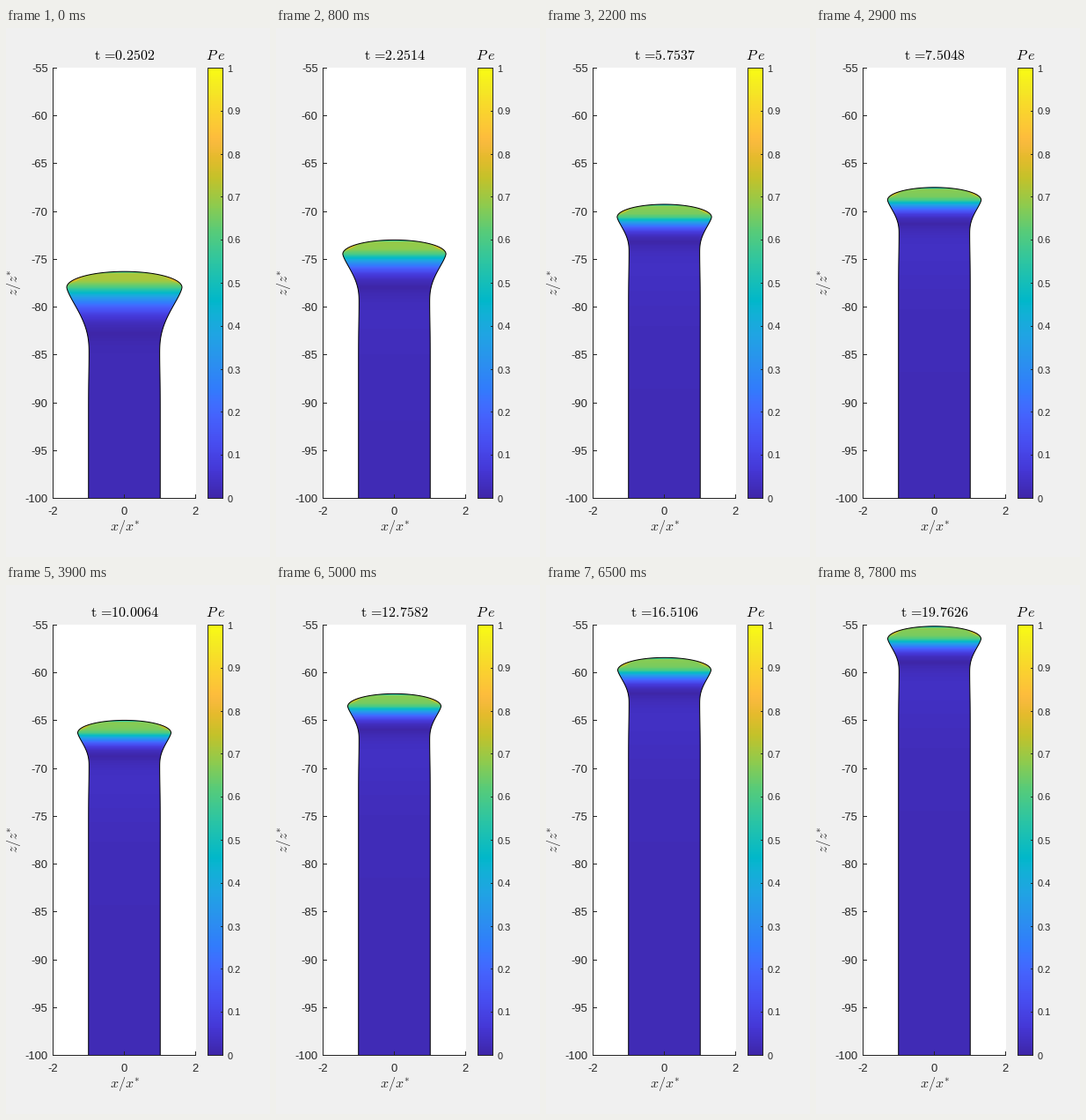
Write a matplotlib script that moves like this. It is 300 by 600 pixels and loops after 7.9 s.

```python
import numpy as np
import matplotlib.pyplot as plt
from matplotlib.animation import FuncAnimation
from matplotlib.colors import LinearSegmentedColormap
from matplotlib.patches import Polygon, Rectangle

W, H, DPI = 300, 600, 100
PX = 72 / DPI  # points per pixel
FRAMES, INTERVAL = 79, 100
DT = 0.25016
INK = "#262626"

LEFT, RIGHT, TOP, BOTTOM = 53, 216, 45, 534
CX, RADIUS = 134.5, 40.75

plt.rcParams["mathtext.fontset"] = "cm"
plt.rcParams["font.family"] = "Liberation Sans"

STOPS = [0, 4, 8, 12, 14, 16, 20, 24, 27, 29, 32, 35, 39, 43, 47, 50, 52, 53,
         57, 60, 63]
COLORS = ["#3e26a8", "#4537d5", "#484df0", "#4563fd", "#3e6fff", "#327cfc",
          "#2b91ef", "#20a5e3", "#12b1d6", "#01b8ca", "#19bfb6", "#31c69f",
          "#57cc7a", "#8fcb4e", "#c5c22a", "#e6bb2d", "#f8ba3d", "#febe3c",
          "#fad62d", "#f5e924", "#f9fb15"]
CMAP = LinearSegmentedColormap.from_list(
    "heat", [(s / 63, c) for s, c in zip(STOPS, COLORS)])

fig = plt.figure(figsize=(W / DPI, H / DPI), dpi=DPI, facecolor="#f0f0f0")
ax = fig.add_axes([0, 0, 1, 1])
ax.axis("off")


def line(x0, y0, x1, y1):
    ax.plot([x0, x1], [y0, y1], color=INK, lw=PX, solid_capstyle="butt",
            snap=False, zorder=5)


def label(x, y, s, size, ha="center", color=INK, **kw):
    return ax.text(x, y, s, fontsize=size * PX, ha=ha, va="baseline",
                   color=color, **kw)


def draw_axes():
    ax.add_patch(Rectangle((LEFT, TOP), RIGHT - LEFT, BOTTOM - TOP,
                           fc="white", ec="none", zorder=0))
    line(LEFT + 0.5, TOP, LEFT + 0.5, BOTTOM)
    line(LEFT, BOTTOM - 0.5, RIGHT, BOTTOM - 0.5)
    for i, y in enumerate(np.linspace(TOP, BOTTOM - 1, 10).round() + 0.5):
        line(LEFT, y, LEFT + 5, y)
        label(47.5, y + 4.5, str(-55 - 5 * i), 13, "right")
    for x, s in zip((53.5, 134.5, 215.5), ("-2", "0", "2")):
        line(x, BOTTOM - 5, x, BOTTOM)
        label(x - 0.5, 552.5, s, 13)
    label(135, 570, "$x/x^{*}$", 16)
    label(13, 289, "$z/z^{*}$", 16, rotation=90, rotation_mode="anchor")


def draw_colorbar():
    x0, x1 = 229, 247
    ax.imshow(np.linspace(1, 0, 256)[:, None], cmap=CMAP, vmin=0, vmax=1,
              extent=(x0, x1, BOTTOM, TOP), interpolation="nearest",
              aspect="auto", zorder=1)
    ax.add_patch(Rectangle((x0 + 0.5, TOP + 0.5), x1 - x0 - 1,
                           BOTTOM - TOP - 1, fc="none", ec=INK, lw=PX,
                           snap=False, zorder=2))
    for i, y in enumerate(np.linspace(BOTTOM - 1, TOP, 11).round() + 0.5):
        line(x1 - 3, y, x1, y)
        label(251.5, y + 4, f"{i / 10:g}", 11, "left")
    label(238.3, 36, r"$P\hspace{0.24}e$", 16, color="black")


def shape(n):
    """Tip position, head half-width, cap height, neck length and swelling."""
    tip = 260.1 - 2.735 * n + 16.1 * np.exp(-n / 4)
    swell = np.exp(-(n / 9.5) ** 1.3)
    return (tip, 53 + 12.5 * swell, 14.3 + 3.7 * swell, 38 + 37 * swell,
            swell)


def outline(tip, head, cap, neck, swell):
    a = np.linspace(0, np.pi / 2, 50)
    u = np.linspace(0, 1, 50)
    d = np.linspace(0, 120, 40)
    waist = RADIUS - 0.6
    x = np.r_[head * np.sin(a),
              waist + (head - waist) * (1 - u ** 1.4) ** 2.7,
              RADIUS - 0.6 * np.exp(-(d / 30) ** 2), RADIUS]
    side = tip + cap + neck
    y = np.r_[tip + cap * (1 - np.cos(a)), tip + cap + neck * u, side + d,
              BOTTOM - 0.5]
    return np.c_[np.r_[CX + x, CX - x[::-1]], np.r_[y, y[::-1]]]


GX, GY = np.meshgrid(np.arange(LEFT, RIGHT) + 0.5,
                     np.arange(TOP, BOTTOM) + 0.5)


def field(tip, head, cap, neck, swell):
    u = (GY - tip - cap) / neck
    crown = 0.675 + 0.05 * swell
    upper = np.interp(
        u, [-0.3, -0.1, 0, 0.04, 0.085, 0.15, 0.22, 0.31, 0.42, 0.54, 0.7],
        [crown, crown - 0.02, 0.6, 0.53, 0.46, 0.36, 0.27, 0.17, 0.08, 0.03,
         0])
    d = np.clip((u - 0.7) * neck, 0, None)
    lower = (0.023 * (1 - np.exp(-d / 12))
             + 0.02 * (1 - swell) * d / 25 * np.exp(1 - d / 25))
    # warm rim along both shoulders, cool sliver under the tip
    r = np.clip(np.abs(GX - CX) / head, 0, 1)
    depth = GY - (tip + cap * (1 - np.sqrt(1 - r ** 2)))
    rim = 0.13 * np.exp(-(depth / 2.2) ** 2 - ((r - 0.85) / 0.1) ** 2)
    sliver = 0.25 * np.exp(-(depth / 1.2) ** 2 - (r / 0.3) ** 2)
    return upper + lower + (rim - sliver) * (u < 0)


draw_axes()
draw_colorbar()
title = label(135, 36, "", 16, color="black")
body = Polygon(outline(*shape(0)), closed=True, fc="none", ec="black", lw=PX,
               snap=False, zorder=4)
ax.add_patch(body)
heat = ax.imshow(field(*shape(0)), cmap=CMAP, vmin=0, vmax=1,
                 extent=(LEFT, RIGHT, BOTTOM, TOP), interpolation="nearest",
                 aspect="auto", zorder=3)
heat.set_clip_path(body)
ax.set_xlim(0, W)
ax.set_ylim(H, 0)


def update(n):
    s = shape(n)
    body.set_xy(outline(*s))
    heat.set_data(field(*s))
    heat.set_clip_path(body)
    t = DT * (n + 1)
    title.set_text(rf"$\mathrm{{t}}\hspace{{0.18}}=\hspace{{-0.2}}{t:.4f}$")
    return body, heat, title


anim = FuncAnimation(fig, update, frames=FRAMES, interval=INTERVAL,
                     repeat=True, blit=False)
plt.show()
```
